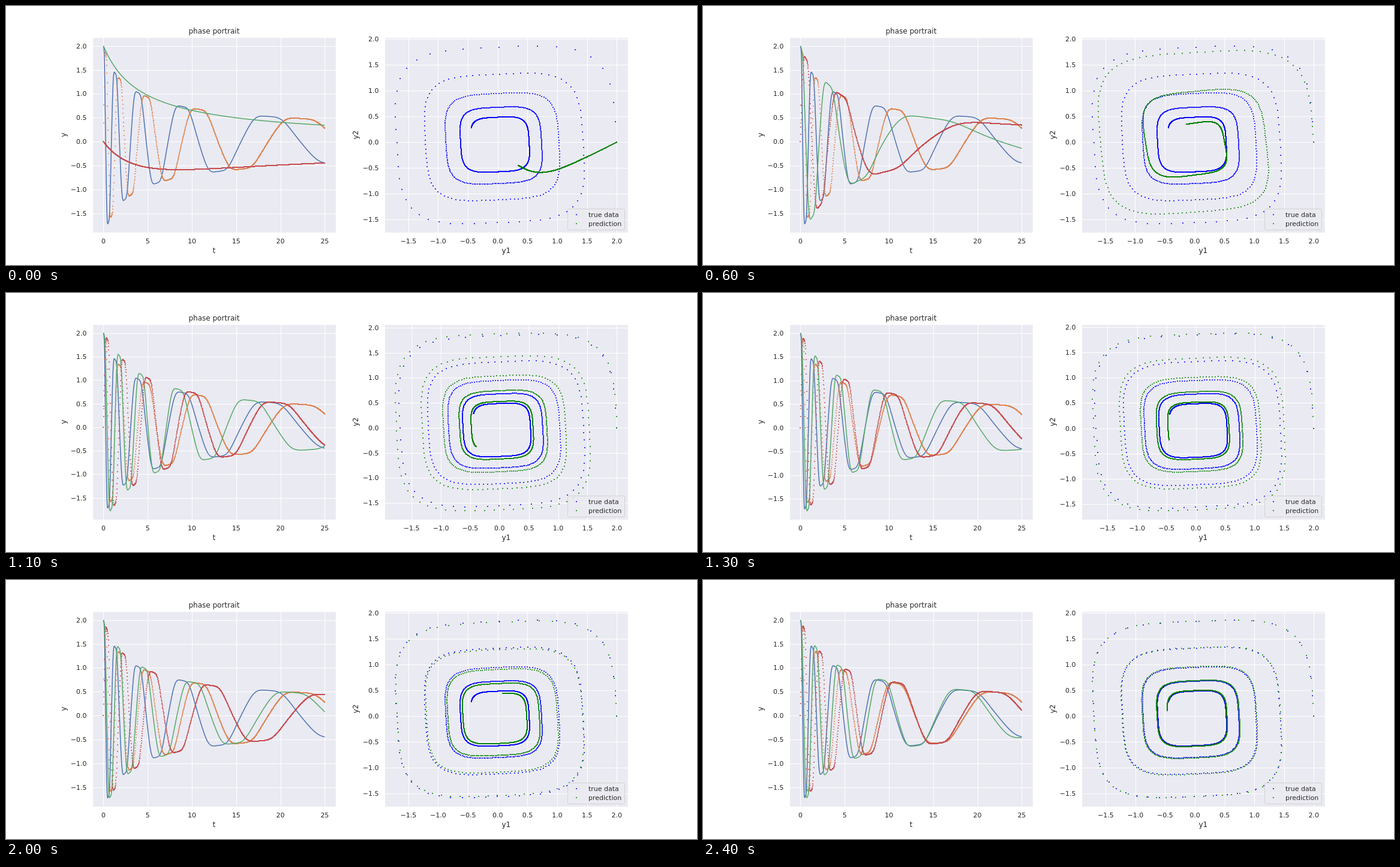
These frames come from a looping animation (1152x432 px, 2.5 s). An HTML page with a canvas:

```html
<!DOCTYPE html>
<html lang="en">
<head>
<meta charset="utf-8">
<title>phase portrait</title>
<style>
  html, body { margin: 0; width: 100%; height: 100%; overflow: hidden; background: #fff; }
  canvas { display: block; width: 1152px; height: 432px; }
</style>
</head>
<body>
<canvas id="stage" width="1152" height="432"></canvas>
<script>
const ctx = document.getElementById("stage").getContext("2d");
const STEP_MS = 100, STEPS = 25, POINTS = 1000, T_END = 25;
const INK = "#262626", PANEL = "#eaeaf2";
const TOP = 51.84, BOTTOM = 378, WIDTH = 405.82;

// Cubic spiral: damping, extra damping inside a radius, rotation,
// and a speed that saturates beyond `knee` with power `sharp`.
const TRUE_MODEL = { damp: 0.1, extra: 0, inner: 1, spin: 2, knee: 1e9, sharp: 4, aspect: 1 };

// Learned model at a few training steps; the steps between are interpolated.
const model = (step, damp, extra, inner, spin, knee, sharp, aspect) =>
  ({ step, damp, extra, inner, spin, knee, sharp, aspect });
const LEARNED = [
  model(0, 0.114, 0.012, 1.2, -0.066, 1.9, 2, 1),
  model(4, 0.0998, 0.191, 0.6, 0.58, 2.63, 4, 1.025),
  model(8, 0.052, 0.0725, 1.3, 1.89, 2.08, 4, 1.027),
  model(11, 0.066, 0.0418, 1.6, 2.06, 2.096, 4, 1),
  model(16, 0.101, 0, 1.5, 2.07, 2.164, 4, 1),
  model(20, 0.1015, 0.01, 1.4, 2.05, 2.25, 4, 1.01),
  model(24, 0.102, 0, 1.4, 2.075, 2.2, 4, 1)
];

function learnedAt(step) {
  const i = Math.max(1, LEARNED.findIndex(m => m.step >= step));
  const a = LEARNED[i - 1], b = LEARNED[i];
  const u = (step - a.step) / (b.step - a.step);
  const mixed = {};
  for (const key in a) mixed[key] = a[key] + (b[key] - a[key]) * u;
  return mixed;
}

function velocity(m, [x, y]) {
  const r = Math.pow(x ** 4 + y ** 4, 0.25);
  const damp = m.damp + m.extra / (1 + (r / m.inner) ** 4);
  const speed = 1 / (1 + (r / m.knee) ** m.sharp);
  const x3 = x ** 3, y3 = y ** 3;
  return [speed * (-damp * x3 - m.spin * y3), speed * (m.spin * x3 - damp * y3)];
}

function rungeKutta(m, p, h) {
  const ahead = (k, s) => [p[0] + k[0] * s, p[1] + k[1] * s];
  const k1 = velocity(m, p);
  const k2 = velocity(m, ahead(k1, h / 2));
  const k3 = velocity(m, ahead(k2, h / 2));
  const k4 = velocity(m, ahead(k3, h));
  return p.map((v, i) => v + h / 6 * (k1[i] + 2 * k2[i] + 2 * k3[i] + k4[i]));
}

function solve(m) {
  const substeps = 3, dt = T_END / (POINTS - 1);
  let p = [2 / m.aspect, 0];
  const path = [];
  for (let i = 0; i < POINTS; i++) {
    path.push({ t: i * dt, y1: p[0] * m.aspect, y2: p[1] });
    for (let s = 0; s < substeps; s++) p = rungeKutta(m, p, dt / substeps);
  }
  return path;
}

const truth = solve(TRUE_MODEL);
const predictions = Array.from({ length: STEPS }, (_, step) => solve(learnedAt(step)));

const snap = v => Math.round(v) + 0.5;

// Maps the data range plus a 5 % margin onto the pixel span.
function axisScale(values, from, to) {
  const min = Math.min(...values), max = Math.max(...values);
  const margin = (max - min) * 0.05;
  const low = min - margin, high = max + margin;
  const scale = v => from + (v - low) / (high - low) * (to - from);
  scale.ticks = gap => {
    const list = [];
    for (let k = Math.ceil(low / gap); k * gap <= high; k++) list.push(k * gap);
    return list;
  };
  return scale;
}

function text(str, x, y, size, align = "center") {
  ctx.font = `${size}px "DejaVu Sans", sans-serif`;
  ctx.textAlign = align;
  ctx.fillStyle = INK;
  ctx.fillText(str, x, y);
}

function segment(x1, y1, x2, y2) {
  ctx.beginPath();
  ctx.moveTo(x1, y1);
  ctx.lineTo(x2, y2);
  ctx.stroke();
}

function drawPanel(left, sx, sy, xGap, xDigits, xLabel, yLabel, yLabelX) {
  const right = left + WIDTH, label = (v, d) => v.toFixed(d).replace("-", "\u2212");
  const l = snap(left), r = snap(right), t = snap(TOP), b = snap(BOTTOM);
  ctx.fillStyle = PANEL;
  ctx.fillRect(l, t, r - l, b - t);
  ctx.strokeStyle = "#fff";
  ctx.lineWidth = 1;
  for (const v of sx.ticks(xGap)) {
    segment(snap(sx(v)), t, snap(sx(v)), b);
    text(label(v, xDigits), sx(v), 396, 11);
  }
  for (const v of sy.ticks(0.5)) {
    segment(l, snap(sy(v)), r, snap(sy(v)));
    text(label(v, 1), left - 9.5, sy(v) + 4, 11, "right");
  }
  ctx.lineWidth = 1.25;
  ctx.strokeRect(l, t, r - l, b - t);
  text(xLabel, left + WIDTH / 2, 411.5, 12);
  ctx.save();
  ctx.translate(yLabelX, (TOP + BOTTOM) / 2);
  ctx.rotate(-Math.PI / 2);
  text(yLabel, 0, 0, 12);
  ctx.restore();
}

function drawLine(path, sx, sy, color) {
  ctx.strokeStyle = color;
  ctx.lineWidth = 1.5;
  ctx.lineJoin = "round";
  ctx.beginPath();
  for (const p of path) ctx.lineTo(sx(p.t), sy(p.y1));
  ctx.stroke();
}

// Dots sit on whole pixel corners.
function dot(x, y, color) {
  ctx.fillStyle = color;
  ctx.beginPath();
  ctx.arc(Math.round(x), Math.round(y), 1, 0, 2 * Math.PI);
  ctx.fill();
}

function drawDots(path, xKey, sx, sy, color) {
  for (const p of path) dot(sx(p[xKey]), sy(p.y2), color);
}

function drawLegend() {
  ctx.beginPath();
  ctx.roundRect(936.5, 338.5, 95, 35, 2);
  ctx.globalAlpha = 0.8;
  ctx.fillStyle = PANEL;
  ctx.fill();
  ctx.strokeStyle = "#ccc";
  ctx.lineWidth = 1;
  ctx.stroke();
  ctx.globalAlpha = 1;
  dot(951, 348, "#00f");
  dot(951, 363, "#008000");
  text("true data", 971, 351.5, 11, "left");
  text("prediction", 971, 367, 11, "left");
}

function draw(step) {
  const guess = predictions[step], both = truth.concat(guess);
  const y1 = both.map(p => p.y1), y2 = both.map(p => p.y2);
  ctx.fillStyle = "#fff";
  ctx.fillRect(0, 0, 1152, 432);

  const time = axisScale([0, T_END], 144, 144 + WIDTH);
  const value = axisScale(y1.concat(y2), BOTTOM, TOP);
  drawPanel(144, time, value, 5, 0, "t", "y", 100);
  text("phase portrait", 144 + WIDTH / 2, 46, 12);
  drawLine(truth, time, value, "#4c72b0");
  drawDots(truth, "t", time, value, "#dd8452");
  drawLine(guess, time, value, "#55a868");
  drawDots(guess, "t", time, value, "#c44e52");

  const left = 630.98;
  const across = axisScale(y1, left, left + WIDTH);
  const up = axisScale(y2, BOTTOM, TOP);
  drawPanel(left, across, up, 0.5, 1, "y1", "y2", 587);
  drawDots(truth, "y1", across, up, "#00f");
  drawDots(guess, "y1", across, up, "#008000");
  drawLegend();
}

const start = performance.now();
let shown = -1;
function tick() {
  const step = Math.floor((performance.now() - start) / STEP_MS) % STEPS;
  if (step !== shown) draw(shown = step);
  requestAnimationFrame(tick);
}
tick();
</script>
</body>
</html>
```
